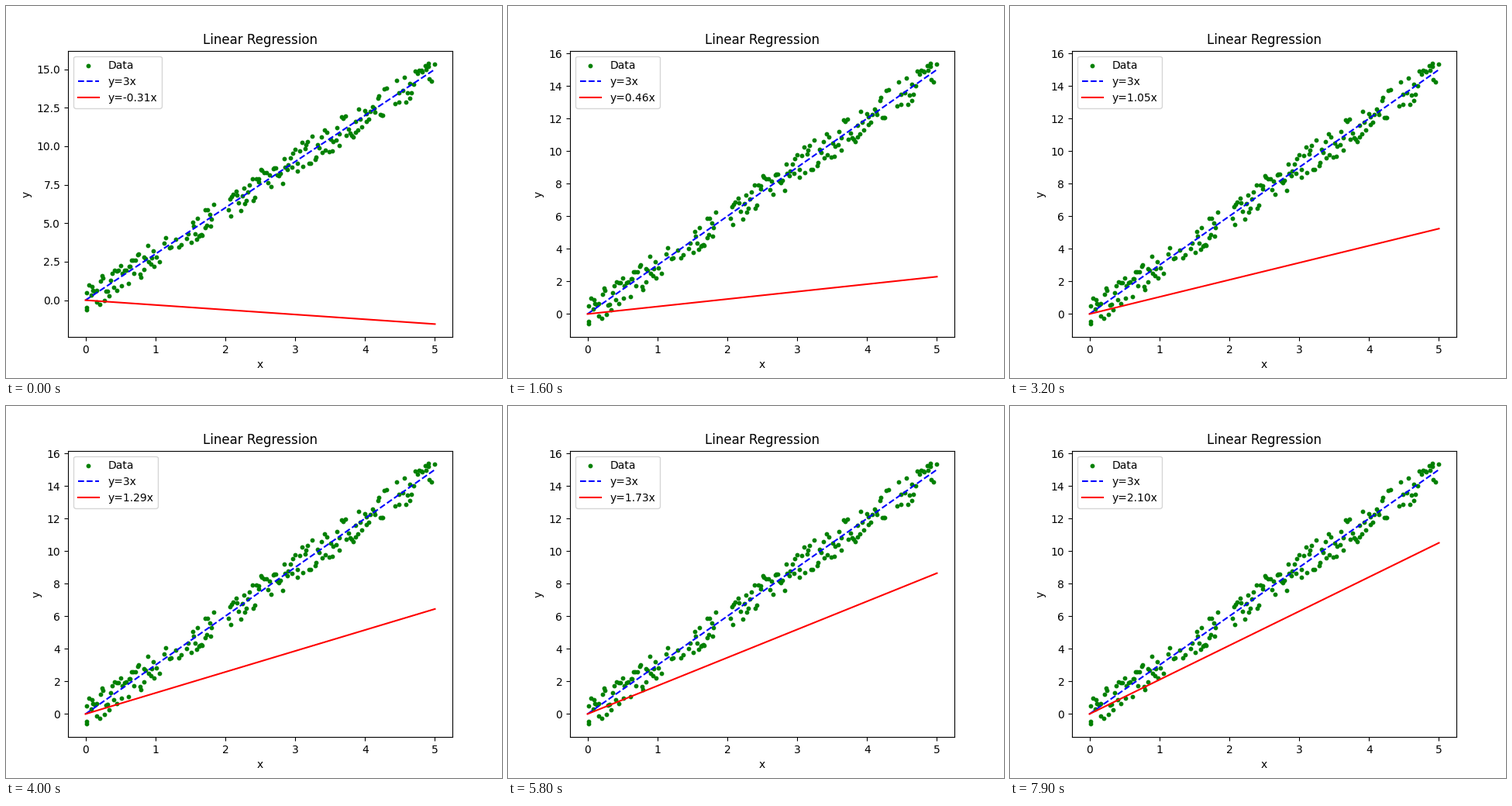
Write a matplotlib script that moves like this. It is 640 px wide and 480 px high and loops after 8 s.

```python
import numpy as np
import matplotlib.pyplot as plt
from matplotlib.animation import FuncAnimation

FRAMES, INTERVAL = 80, 100
TRUE_SLOPE, START_SLOPE, RATE = 3, -0.31, 0.0165
Y_MIN, Y_MAX = -0.617, 15.365

# Extremes of the cloud.
ENDS = [(.02, Y_MIN), (.02, -.45), (.02, .5), (4.91, Y_MAX), (5, 15.33)]
# Clusters along x: start, end, count.
CLUSTERS = [(.04, 1.02, 48), (1.04, 1.5, 10), (1.5, 1.84, 18),
            (2.02, 4.32, 100), (4.41, 4.97, 22)]


def make_data():
    rng = np.random.default_rng(7)
    x = np.concatenate([lo + (np.arange(n) + rng.random(n)) * (hi - lo) / n
                        for lo, hi, n in CLUSTERS])
    y = TRUE_SLOPE * x + rng.uniform(-.95, .95, x.size)
    y = np.clip(y, Y_MIN + .3, Y_MAX - .03)
    return np.vstack([ENDS, np.column_stack([x, y])]).T


def slope_at(step):
    return TRUE_SLOPE - (TRUE_SLOPE - START_SLOPE) * np.exp(-RATE * step)


data_x, data_y = make_data()
line_x = np.array([0, 5])

fig, ax = plt.subplots(figsize=(6.4, 4.8), dpi=100)


def draw(step):
    slope = slope_at(step)
    ax.clear()
    ax.scatter(data_x, data_y, s=10, color="green", label="Data")
    ax.plot(line_x, TRUE_SLOPE * line_x, "b--", label="y=3x")
    ax.plot(line_x, slope * line_x, "r", label=f"y={slope:.2f}x")
    ax.set(title="Linear Regression", xlabel="x", ylabel="y")
    ax.legend(loc="upper left")


anim = FuncAnimation(fig, draw, frames=FRAMES, interval=INTERVAL,
                     init_func=lambda: None, repeat=True)
plt.show()
```
